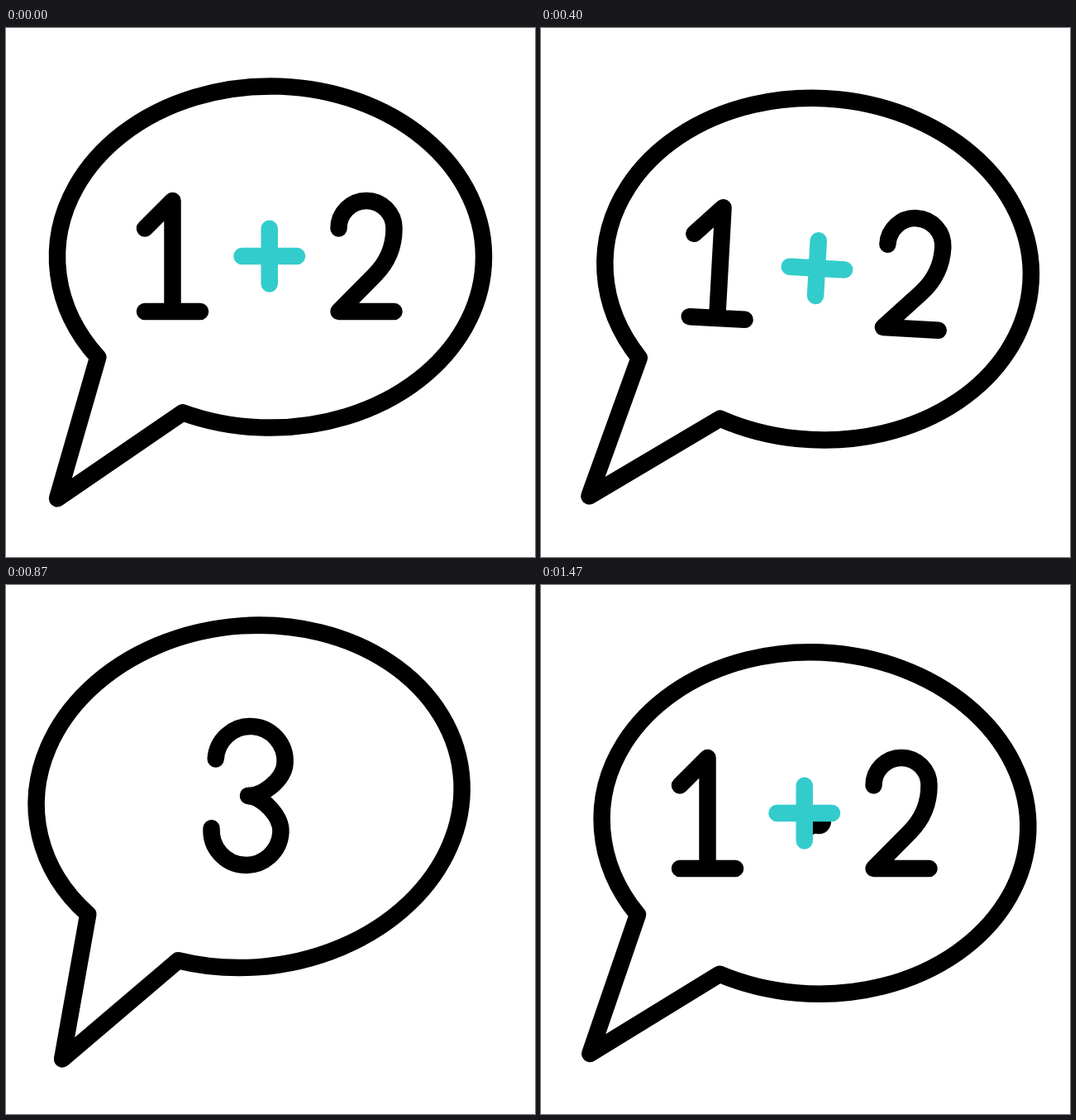
An HTML page with a canvas for the animation above (1.67 s loop, 640 by 640 pixels).

```html
<!DOCTYPE html>
<html lang="en">
<head>
<meta charset="utf-8">
<title>Sum in a speech bubble</title>
<style>
  html, body { margin: 0; width: 100%; height: 100%; overflow: hidden; background: #fff; }
  canvas { display: block; width: 100vmin; height: 100vmin; }
</style>
</head>
<body>
<canvas id="stage" width="640" height="640"></canvas>
<script>
const ctx = document.getElementById('stage').getContext('2d');
const LOOP = 1670, STEP = 100 / 3, LAST = 49;
const INK = '#000', TEAL = '#33cccc', LINE = 20.5;
const PIVOT = [105.5, 513], MID = [319, 276];
const rad = deg => deg * Math.PI / 180;

// Keys are [step, value] pairs, joined by straight lines.
const SWING = [[0, 0], [7, -9.75], [9, -9.75], [14, 12.8], [16, 12.8], [26, -6], [33, 2.85]];
const SUM_TURN = [[0, 0], [7, -16.7], [9, -16.7], [14, 16.4], [17, 16.4], [40, -60], [44, 0]];
const SUM_SIZE = [[14, 1], [17, 0], [40, 0], [44, 1]];
const THREE_DRAW = [[17, 0], [23, 1], [31, 1], [35, 0]];
const THREE_TURN = [[17, 3.5], [30, 3.5], [35, -5]];
const THREE_SIZE = [[31, 1], [35, 1.45]];
const THREE_SPLIT = [[31, 0], [35, 3.8]];

function at(keys, n) {
  if (n <= keys[0][0]) return keys[0][1];
  for (let i = 1; i < keys.length; i++) {
    const [a, va] = keys[i - 1], [b, vb] = keys[i];
    if (n <= b) return va + (vb - va) * (n - a) / (b - a);
  }
  return keys[keys.length - 1][1];
}

const bubble = new Path2D();
bubble.ellipse(320, 277, 258, 206.6, 0, rad(114.3), rad(144), true);
bubble.lineTo(62, 569.3);
bubble.closePath();

const digits = new Path2D(
  'M168 242.5L201.5 209V343M168 343H235' +
  'M402.5 242.5A33.5 33.5 0 0 1 469.5 242.5C469.5 264 461 284 446 299L402.5 343H469.5');
const plus = new Path2D('M285.5 276H352M318.7 242.7V309.5');
const upper = new Path2D('M0 0C17 0 42 -22 42 -42A42 42 0 0 0 -42 -42');
const lower = new Path2D('M0 0C17 0 42 22 42 42A42 42 0 0 1 -42 42');
const ARC = 198;

function stroke(path, color) {
  ctx.strokeStyle = color;
  ctx.stroke(path);
}

// Carries a point along with the swinging bubble.
function carried([x, y], deg) {
  const c = Math.cos(rad(deg)), s = Math.sin(rad(deg));
  const u = x - PIVOT[0], v = y - PIVOT[1];
  return [PIVOT[0] + u * c - v * s, PIVOT[1] + u * s + v * c];
}

function place([x, y], deg, size, paint) {
  ctx.save();
  ctx.translate(x, y);
  ctx.rotate(rad(deg));
  ctx.scale(size, size);
  paint();
  ctx.restore();
}

function drawBubble(swing) {
  place(PIVOT, swing, 1, () => {
    ctx.translate(-PIVOT[0], -PIVOT[1]);
    stroke(bubble, INK);
  });
}

function drawThree(n, mid) {
  const part = at(THREE_DRAW, n), split = at(THREE_SPLIT, n);
  place(mid, at(THREE_TURN, n), at(THREE_SIZE, n), () => {
    if (part < 1) ctx.setLineDash([Math.max(0.1, part * ARC), 999]);
    ctx.translate(split, 0);
    stroke(upper, INK);
    ctx.translate(-2 * split, 0);
    stroke(lower, INK);
  });
}

function drawSum(n, mid) {
  const size = at(SUM_SIZE, n);
  if (size <= 0) return;
  place(mid, at(SUM_TURN, n), size, () => {
    ctx.translate(-MID[0], -MID[1]);
    stroke(digits, INK);
    stroke(plus, TEAL);
  });
}

function draw(n) {
  const swing = at(SWING, n), mid = carried(MID, swing);
  ctx.fillStyle = '#fff';
  ctx.fillRect(0, 0, 640, 640);
  ctx.lineWidth = LINE;
  ctx.lineCap = ctx.lineJoin = 'round';
  drawBubble(swing);
  if (n >= 17) drawThree(n, mid);
  drawSum(n, n < 40 ? mid : MID);
}

const start = performance.now();
function tick() {
  const t = (performance.now() - start) % LOOP;
  draw(Math.min(LAST, Math.floor((t + 3.4) / STEP)));
  requestAnimationFrame(tick);
}
tick();
</script>
</body>
</html>
```
